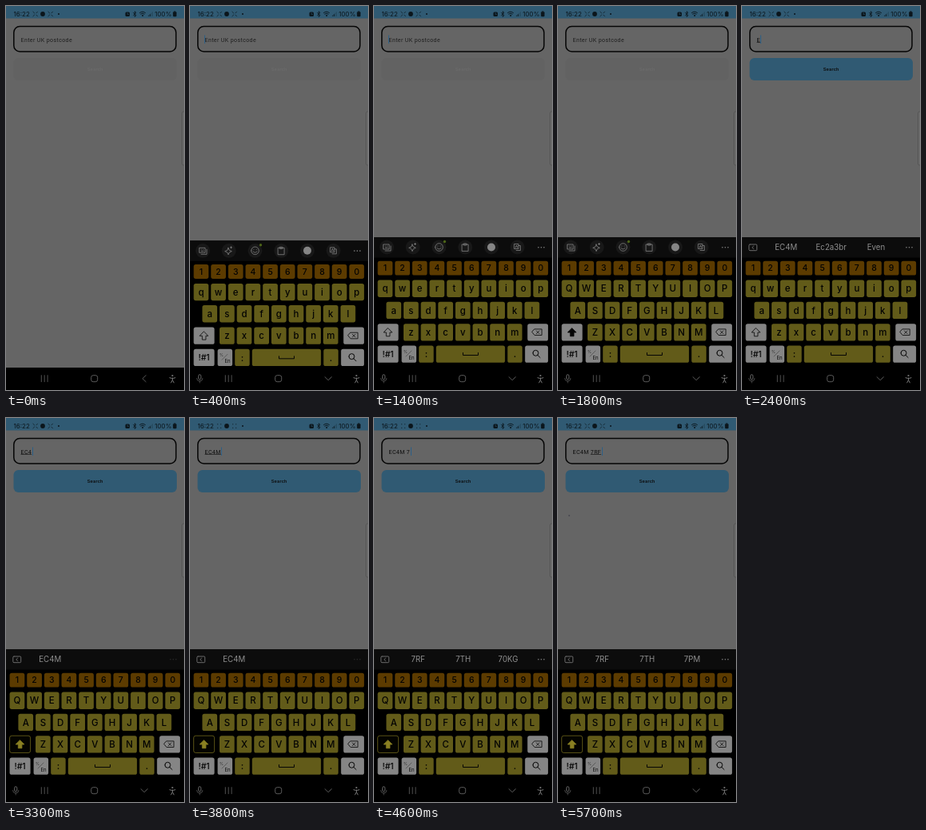
Write an HTML page that moves like this. It is 223x480 px and loops after 5.8 s.

```html
<!DOCTYPE html>
<html lang="en">
<head>
<meta charset="utf-8">
<title>Postcode search</title>
<style>
html, body { margin: 0; width: 100%; height: 100%; overflow: hidden; background: #000; }
svg { display: block; width: 100vw; height: 100vh; }
text { font-family: Inter, Roboto, sans-serif; white-space: pre; }
.form { font-family: Roboto, "Noto Sans", sans-serif; letter-spacing: 0.4px; }
.mid { text-anchor: middle; }
.line { stroke-linecap: round; stroke-linejoin: round; }
</style>
</head>
<body>
<svg id="stage" viewBox="0 0 223 480"></svg>
<script>
const LOOP = 5800;
const PAGE = '#656565', BLUE = '#305a73', INK = '#0c0c0c';
const YELLOW = '#625b19', ORANGE = '#5c3b00', GREY = '#858585', PALE = '#858585';
const stage = document.getElementById('stage');

function add(parent, tag, attrs, content) {
  const el = document.createElementNS('http://www.w3.org/2000/svg', tag);
  for (const k in attrs) el.setAttribute(k, attrs[k]);
  if (content !== undefined) el.textContent = content;
  parent.appendChild(el);
  return el;
}
const group = parent => add(parent, 'g', {});
const rect = (p, x, y, width, height, fill, rx = 0) => add(p, 'rect', { x, y, width, height, fill, rx });
const circle = (p, cx, cy, r, fill) => add(p, 'circle', { cx, cy, r, fill });
const line = (p, d, stroke, w = 0.8) =>
  add(p, 'path', { d, stroke, 'stroke-width': w, fill: 'none', class: 'line' });
const label = (p, x, y, size, fill, s, extra = {}) =>
  add(p, 'text', { x, y, 'font-size': size, fill, ...extra }, s);
const show = (el, on) => el.setAttribute('visibility', on ? 'visible' : 'hidden');
const put = (el, s) => { if (el.textContent !== s) el.textContent = s; };
const mid = { class: 'mid' }, form = { class: 'form' };

// Page
rect(stage, 0, 0, 223, 480, PAGE);
rect(stage, 0, 0, 223, 15.5, BLUE);
rect(stage, 220.5, 132, 5, 67, '#6a6a6a', 2).setAttribute('stroke', '#555');

// Status bar
const dark = '#0b151b';
label(stage, 9.5, 12.9, 8, dark, '16:22');
const tickIcons = [36.7, 55.7].map(x => {
  const open = line(stage, [[-1, -1], [1, -1], [-1, 1], [1, 1]].map(([a, b]) =>
    `M${x + a * 2.8} ${10 + b * 2.8}l${-a * 1.7} ${-b * 1.7}`).join(''), dark, 0.7);
  const dots = group(stage);
  for (const a of [-2, 2]) for (const b of [-2.3, 2.3]) circle(dots, x + a, 10 + b, 0.55, dark);
  return { open, dots };
});
circle(stage, 46, 10, 2.9, dark);
circle(stage, 66, 10, 1, dark);
rect(stage, 149.5, 7.5, 5.5, 5.5, dark, 1.5);
line(stage, 'M152.2 8.7v1.7h1.3', BLUE, 0.6);
line(stage, 'M159.5 8.2l3.6 3.6-1.8 1.6V6.8l1.8 1.6-3.6 3.4', dark, 0.8);
line(stage, 'M167.5 8.5q3.5-2.8 7 0M168.7 10q2.3-1.8 4.6 0', dark, 0.9);
circle(stage, 171.2, 12, 1, dark);
for (let i = 0; i < 4; i++) rect(stage, 178.4 + i * 1.5, 11.6 - i * 1.4, 0.8, 1.4 + i * 1.4, i < 2 ? dark : '#234457');
label(stage, 186.3, 12.9, 8, dark, '100%');
rect(stage, 209.2, 7.2, 4.4, 6, dark, 1);
rect(stage, 210.4, 6.4, 2, 1, dark);

// Form
const field = rect(stage, 9.8, 25.5, 203.2, 31.5, 'none', 7.5);
field.setAttribute('stroke', '#050505');
field.setAttribute('stroke-width', 1.5);
const hint = label(stage, 18.5, 44.5, 7, '#1f1f1f', 'Enter UK postcode', form);
const entry = label(stage, 18.5, 44.5, 7, INK, '', form);
const underline = rect(stage, 18.5, 45.4, 0, 0.6, INK);
const caret = rect(stage, 18, 36.5, 1, 10.5, '#2d5f86');
const button = rect(stage, 9.5, 65, 204.5, 28, '#626262', 6);
const buttonText = label(stage, 111.7, 81.2, 6, INK, 'Search',
  { class: 'form mid', 'font-weight': 500, style: 'letter-spacing:.2px' });
const spinner = circle(stage, 14, 122, 0.9, '#454550');

// Keyboard
const board = group(stage);
rect(board, 0, 289, 223, 191, '#000');
rect(board, 0, 289, 223, 25.5, '#0c0c0c');

const tools = group(board);
[16, 48.7, 81.5, 114.3, 147, 179.7].forEach(x => circle(tools, x, 301.5, 9, '#181818'));
line(tools, 'M12 298h7v6h-7zM14 306h7v-6M14 300h.2M16.5 300h.2M14 302h3', PALE);
line(tools, 'M48 298l1.3 3 3 1.3-3 1.3-1.3 3-1.3-3-3-1.3 3-1.3zM51.5 296.5v2M50.5 297.5h2', PALE);
line(tools, 'M76.7 301.5a4.8 4.8 0 1 0 9.6 0a4.8 4.8 0 1 0-9.6 0M79 302.5q2.5 3 5 0M79.8 300h.1M83.2 300h.1', PALE);
circle(tools, 88.5, 294.5, 1.7, '#4c6418');
line(tools, 'M110.5 298h7.6v8.4h-7.6zM112.7 297h3.2v2h-3.2z', PALE);
circle(tools, 147, 301.5, 5, PALE);
line(tools, 'M176 297.5h5v6h-5zM178.2 305.5h5.2v-6H181M177.3 302l1.2-3 1.2 3', PALE);

const bar = group(board);
line(bar, 'M10 298h7.5q1.2 0 1.2 1.2v5.3q0 1.2-1.2 1.2H10q-1.2 0-1.2-1.2v-5.3q0-1.2 1.2-1.2M14.5 300.2l-1.8 1.7 1.8 1.7', PALE);
const words = [55.2, 111.7, 168].map(x => label(bar, x, 305.3, 9.7, '#8f8f8f', '', mid));
const more = group(board);
[206, 209.5, 213].forEach(x => circle(more, x, 301.8, 0.8, PALE));

const keys = {}, letters = [];
function key(id, x, y, w, h, fill, s, size = 11.5) {
  keys[id] = { el: rect(board, x, y, w, h, fill, 2.6), fill };
  if (!s) return;
  const t = label(board, x + w / 2, y + h / 2 + size * 0.36, size, '#030303', s, { ...mid, 'font-weight': 500 });
  if (/[a-z]/.test(s)) letters.push({ t, s });
}
const row = (chars, x, y, h, fill, size) =>
  [...chars].forEach((c, i) => key(c, x + i * 21.65, y, 18.7, h, fill, c, size));
row('1234567890', 4.6, 318.8, 17.8, ORANGE, 10.5);
row('qwertyuiop', 4.6, 342.6, 21.3, YELLOW);
row('asdfghjkl', 15.4, 369.8, 21.3, YELLOW);
row('zxcvbnm', 37, 397.2, 21.3, YELLOW);
key('shift', 4.6, 397.2, 26, 21.3, GREY);
key('del', 192.3, 397.2, 25.8, 21.3, GREY);
key('sym', 4.6, 424.5, 26, 21.3, GREY, '!#1', 10.5);
key('lang', 34.6, 424.5, 18.5, 21.3, GREY);
key(':', 56.2, 424.5, 18.5, 21.3, YELLOW, ':');
key('space', 77.8, 424.5, 86.3, 21.3, YELLOW);
key('.', 167.3, 424.5, 18.5, 21.3, YELLOW, '.');
key('go', 189.2, 424.5, 28.9, 21.3, GREY);

const arrow = line(board, 'M17.6 402.8l5.2 5.2h-2.9v4.8h-4.6V408h-2.9z', '#050505');
line(board, 'M201.2 403.9h9v7.6h-9l-3.2-3.8zM203.5 406l3.6 3.6M207.1 406l-3.6 3.6', '#050505');
line(board, 'M111.5 433.5v3h19v-3', '#050505', 1);
line(board, 'M40 438l7-7', '#333', 0.5);
label(board, 37, 434, 5, '#333', '%');
label(board, 43.5, 442, 6, '#0c0c0c', 'En');
line(board, 'M199 433.8a3.5 3.5 0 1 0 7 0a3.5 3.5 0 1 0-7 0M205.1 436.5l3 3', '#050505', 1);

// Navigation
const nav = '#656565';
rect(stage, 0, 452, 223, 28, '#000');
line(stage, 'M44.3 461.7v8M48.2 461.7v8M52.1 461.7v8', nav);
const home = rect(stage, 106.7, 461.7, 8, 8, 'none', 2.5);
home.setAttribute('stroke', nav);
home.setAttribute('stroke-width', 0.9);
const back = line(stage, 'M175.2 461.7l-4.2 4 4.2 4', nav, 0.9);
const hide = line(stage, 'M169 463.7l4.2 4 4.2-4', nav, 0.9);
circle(stage, 208.5, 462, 1.1, '#777');
line(stage, 'M205 464.7l2.6.7h1.8l2.6-.7M208.5 465v2.7l-1.8 3.2M208.5 467.7l1.8 3.2', '#777', 1);
const mic = group(stage);
rect(mic, 10.6, 460.8, 3.2, 6, 'none', 1.6).setAttribute('stroke', nav);
line(mic, 'M8.5 465.5q0 3.4 3.7 3.4t3.7-3.4M12.2 469v2', nav, 0.7);

// [time, text, start of underlined word, suggestions]
const typing = [
  [0, '', 0, null],
  [2100, 'E', 0, ['EC4M', 'Ec2a3br', 'Even']],
  [2800, 'EC', 0, ['EC4M', 'EC2A3BR', 'EACH']],
  [3200, 'EC4', 0, ['EC4M', '', '']],
  [3500, 'EC4M', 0, ['EC4M', '', '']],
  [4000, 'EC4M ', -1, ['7RF', '7TH', '7PM']],
  [4500, 'EC4M 7', -1, ['7RF', '7TH', '70KG']],
  [4900, 'EC4M 7R', 5, ['7RF', '7TH', '7PM']],
  [5200, 'EC4M 7RF', 5, ['7RF', '7TH', '7PM']]
];
const presses = [[2100, 'e'], [2800, 'c'], [3200, '4'], [3500, 'm'], [4000, 'space'], [4500, '7'], [4900, 'r'], [5200, 'f']];

function lengthOf(s) {
  return s ? entry.getSubStringLength(0, s.length) : 0;
}

function draw(t) {
  const rise = Math.min(1, Math.max(0, (t - 150) / 350));
  const open = t >= 200;
  board.setAttribute('transform', `translate(0 ${191 * (1 - rise) ** 3})`);
  show(back, !open);
  show(hide, open);
  show(mic, open);

  const [since, text, start, suggested] = typing.filter(s => s[0] <= t).pop();
  put(entry, text);
  show(hint, !text);
  button.setAttribute('fill', text ? BLUE : '#626262');
  buttonText.setAttribute('fill', text ? INK : '#6b6b6b');

  const end = lengthOf(text), from = start > 0 ? lengthOf(text.slice(0, start)) : 0;
  underline.setAttribute('x', 18.5 + from);
  underline.setAttribute('width', start < 0 ? 0 : Math.max(0, end - from));
  caret.setAttribute('x', text ? Math.round(18.9 + end) : 18);
  show(caret, text ? (t - since) % 1000 < 550 : t >= 300 && (t - 300) % 1000 < 500);

  show(tools, !suggested);
  show(bar, suggested);
  if (suggested) words.forEach((w, i) => put(w, suggested[i]));
  more.setAttribute('opacity', suggested && !suggested[1] ? 0.25 : 1);

  const locked = t >= 2600, upper = locked || (t >= 1700 && t < 2100);
  letters.forEach(({ t: el, s }) => put(el, upper ? s.toUpperCase() : s));
  const shift = keys.shift.el;
  shift.setAttribute('fill', locked ? '#040400' : GREY);
  shift.setAttribute('stroke', locked ? YELLOW : 'none');
  shift.setAttribute('stroke-width', 0.9);
  arrow.setAttribute('fill', locked ? '#8a8022' : upper ? '#050505' : 'none');
  arrow.setAttribute('stroke', locked ? '#8a8022' : '#050505');

  for (const [at, id] of presses) {
    const down = t >= at - 100 && t < at + 50;
    keys[id].el.setAttribute('fill', down ? '#464112' : keys[id].fill);
  }

  const dotted = t >= 3600 && t < 5300;
  tickIcons.forEach(({ open: ticks, dots }) => {
    show(ticks, !dotted);
    show(dots, dotted);
  });
  show(spinner, t >= 5500);
}

function tick(now) {
  draw(now % LOOP);
  requestAnimationFrame(tick);
}
draw(0);
requestAnimationFrame(tick);
</script>
</body>
</html>
```
